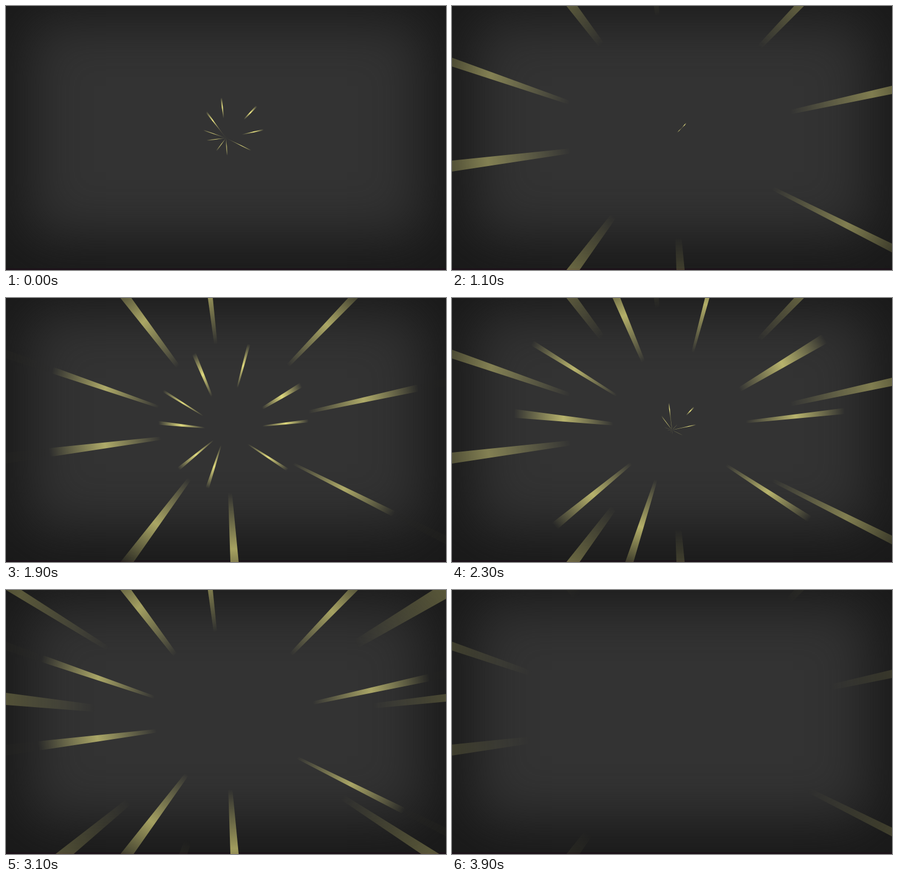
An HTML page with a canvas that plays this animation: 800 px wide and 480 px high, repeating every 4.1 s.

```html
<!DOCTYPE html>
<html lang="en">
<head>
<meta charset="utf-8">
<title>Light rays</title>
<style>
  html, body { margin: 0; width: 100%; height: 100%; overflow: hidden; background: #1c1219; }
  .backdrop { height: 477px; background: #333; box-shadow: inset 0 -15px 100px 40px #191919; }
  canvas { position: absolute; left: 0; top: 0; }
</style>
</head>
<body>
<div class="backdrop"></div>
<canvas id="stage" width="800" height="480"></canvas>
<script>
const ctx = document.getElementById('stage').getContext('2d');

const LOOP = 4100, STEP = 100, LAST = 3900;
const SPEED = 0.41;       // ring growth, px per ms
const MAX_RADIUS = 870;   // ring is fully faded here
const APEX = [400, 240];  // where all wedges meet
const RING = [413.5, 217.5];

// Wedge builders: two points on one side of the stage
const top_ = (a, b) => [a, 0, b, 0];
const bottom = (a, b) => [a, 480, b, 480];
const left = (a, b) => [0, a, 0, b];
const right = (a, b) => [800, a, 800, b];

const burstA = [
  top_(208, 228), top_(367, 376), top_(622, 640),
  right(145, 160), right(432, 448),
  bottom(408, 423), bottom(208, 232),
  left(281, 301), left(94, 110)
];
const burstB = [
  top_(0, 28), top_(292, 306), top_(460, 468),
  [776, 0, 800, 16], right(189, 203),
  bottom(755, 788), bottom(315, 330), bottom(90, 123),
  left(187, 209)
];

const pulses = [
  { start: -135, rays: burstA },
  { start: 1068, rays: burstA },
  { start: 1566, rays: burstB },
  { start: 2220, rays: burstA }
];

// Stretches a point away from the apex so corner wedges reach the stage edge
const extend = (x, y) => [APEX[0] + (x - APEX[0]) * 1.1, APEX[1] + (y - APEX[1]) * 1.1];

function drawPulse({ start, rays }, time) {
  const radius = (time - start) * SPEED;
  if (radius <= 0 || radius >= MAX_RADIUS) return;
  const glow = ctx.createRadialGradient(...RING, 0, ...RING, radius);
  glow.addColorStop(0.4, 'rgba(255,248,140,0)');
  glow.addColorStop(0.7, 'rgba(255,248,140,1)');
  glow.addColorStop(1, 'rgba(255,248,140,0)');
  ctx.globalAlpha = 1 - radius / MAX_RADIUS;
  ctx.fillStyle = glow;
  for (const [x1, y1, x2, y2] of rays) {
    ctx.beginPath();
    ctx.moveTo(...APEX);
    ctx.lineTo(...extend(x1, y1));
    ctx.lineTo(...extend(x2, y2));
    ctx.fill();
  }
}

const origin = performance.now();

function render() {
  const elapsed = (performance.now() - origin) % LOOP;
  const time = Math.min(Math.floor(elapsed / STEP) * STEP, LAST);
  ctx.clearRect(0, 0, 800, 480);
  pulses.forEach(pulse => drawPulse(pulse, time));
  requestAnimationFrame(render);
}
render();
</script>
</body>
</html>
```
